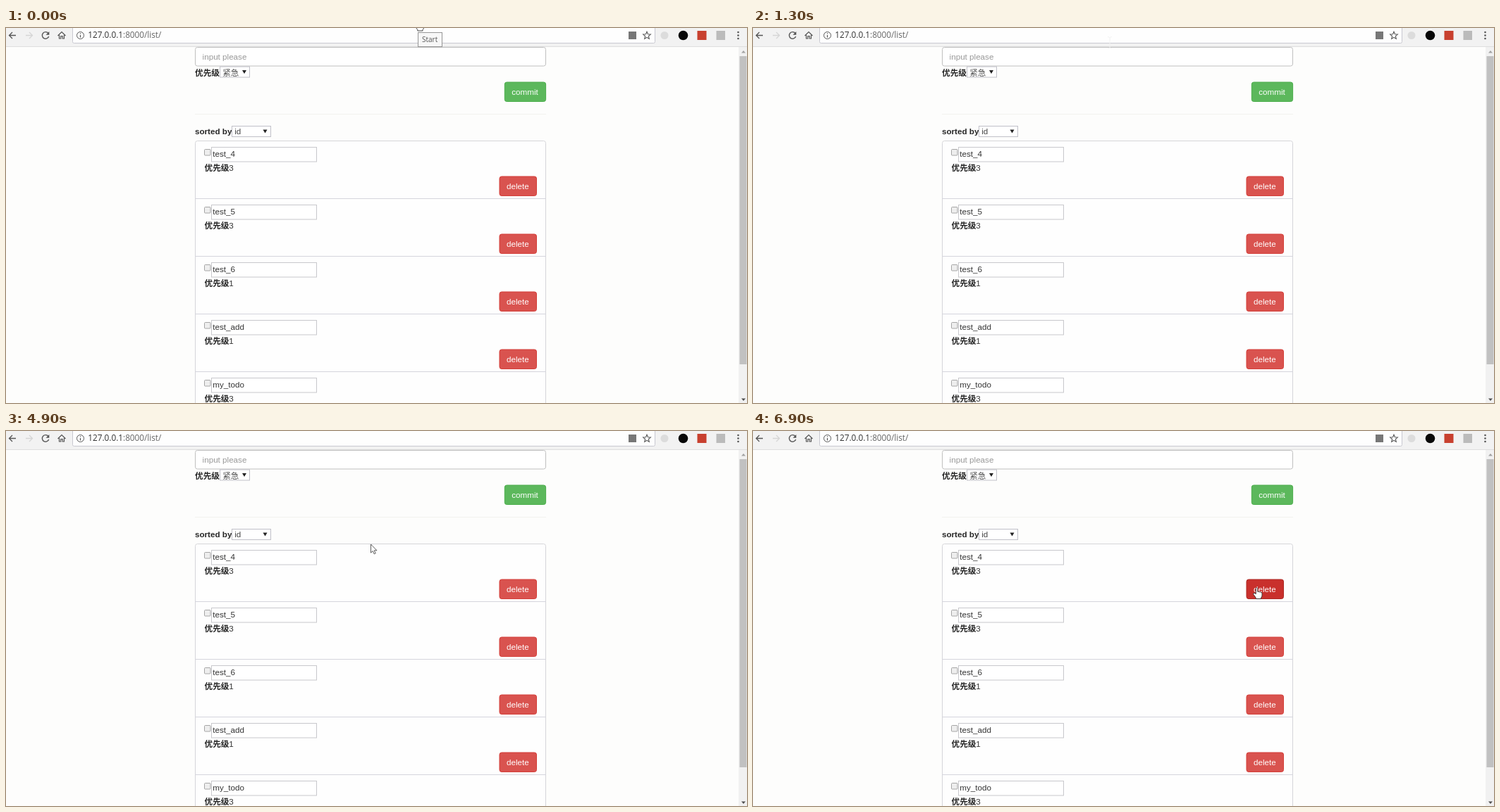
Recreate the animation shown at these times as an HTML page. Size 1051x533 px, loop 8 s.

```html
<!DOCTYPE html>
<html lang="en">
<head>
<meta charset="utf-8">
<title>Todo list</title>
<style>
html, body { margin: 0; width: 100%; height: 100%; overflow: hidden; background: #fdfdfc; }
svg { display: block; width: 1051px; height: 533px; }
text { font: 11.65px "Liberation Sans", "Noto Sans CJK SC", "Noto Sans CJK", sans-serif; fill: #333; white-space: pre; }
.b { font-weight: bold; fill: #262626; }
.ui { font: 11.75px "Open Sans", sans-serif; }
.tip text { font: 10px "Open Sans", sans-serif; fill: #575757; }
</style>
</head>
<body>
<svg id="stage" viewBox="0 0 1051 533" xmlns="http://www.w3.org/2000/svg">
  <g id="page"></g>
  <g id="chrome"></g>
  <g id="tips"></g>
  <g id="arrow">
    <path d="M.5.5V12.6L3.3 10 5.2 14.3 7.2 13.4 5.3 9.3H9Z" fill="#fff" stroke="#4a4a4a" stroke-width=".9"/>
  </g>
  <g id="beam">
    <path d="M-3-8H-1L0-7 1-8H3M0-7V7M-3 8H-1L0 7 1 8H3" fill="none" stroke="#f1f1f1"/>
  </g>
  <g id="hand">
    <path d="M-1.2 9V1Q0-1 1.3 1V6Q2.8 5 3.6 6.5 5 5.6 5.8 7 7.4 6.5 7.5 8.3V11.5Q7.3 13.5 6 14.5V16H-1.2V14.6L-4.8 9.6Q-5.2 7.7-3.3 7.9Z" fill="#fff" stroke="#333" stroke-width=".9"/>
  </g>
</svg>
<script>
const $ = id => document.getElementById(id);
const LOOP = 8000, STEP = 100;
const LEFT = 268.5, WIDTH = 497, ROW = 82, TOP = 160;

const rect = (x, y, w, h, fill, stroke = 'none', r = 0) =>
  `<rect x="${x}" y="${y}" width="${w}" height="${h}" rx="${r}" fill="${fill}" stroke="${stroke}"/>`;
const text = (x, y, s, cls = '', fill = '') =>
  `<text x="${x}" y="${y}" class="${cls}"${fill && ` style="fill:${fill}"`}>${s}</text>`;
const path = (d, stroke, fill = 'none', w = 1) =>
  `<path d="${d}" stroke="${stroke}" fill="${fill}" stroke-width="${w}"/>`;
const dot = (x, y, r, fill, stroke = 'none') =>
  `<circle cx="${x}" cy="${y}" r="${r}" fill="${fill}" stroke="${stroke}"/>`;

const caret = (x, y) => path(`M${x - 3} ${y - 2.5}h6l-3 5z`, 'none', '#222');
const select = (x, y, w, label, base, arrowX, fill) =>
  rect(x, y, w, 15, '#fff', '#c0c0c8') + text(x + 3.7, base, label, '', fill) + caret(arrowX, y + 7.5);
const button = (x, y, w, label, fill, stroke, id = '') =>
  `<g id="${id}">` + rect(x, y, w, 27.5, fill, stroke, 3) + text(x + 10, y + 18, label, '', '#fff') + '</g>';

function item(name, level, i) {
  const y = TOP + i * ROW;
  return (i ? path(`M${LEFT} ${y + .5}h${WIDTH}`, '#d5d5dd') : '')
    + rect(281.5, y + 12.5, 8.5, 8.5, '#eee', '#a5a5a5', 1)
    + rect(291.5, y + 9.5, 149, 20.5, '#fff', '#c8c8cc')
    + text(293.3, y + 23, name)
    + text(281.5, y + 43, '优先级', 'b') + text(316.3, y + 43, level)
    + button(700, y + 51, 52.5, 'delete', '#d9534f', '#d43f3a', 'del' + i);
}

function buildPage() {
  const items = [['test_4', 3], ['test_5', 3], ['test_6', 1], ['test_add', 1], ['my_todo', 3]];
  $('page').innerHTML = rect(0, 0, 1051, 533, '#fdfdfc')
    + rect(LEFT, 27.5, WIDTH, 26.5, '#fff', '#c0c0c0', 3)
    + text(278.6, 45, 'input please', '', '#999')
    + text(268, 68, '优先级', 'b')
    + select(303.5, 55, 42, '紧急', 68, 338, '#555')
    + button(707.3, 77, 58.3, 'commit', '#5cb85c', '#4cae4c')
    + path('M268 122.5h498', '#f2f2ef')
    + text(268, 151, 'sorted by', 'b')
    + select(320.5, 139.5, 55, 'id', 151, 367.5, '#444')
    + path(`M${LEFT} 533V163.5q0-3 3-3h${WIDTH - 6}q3 0 3 3V533`, '#d5d5d9', '#fefefe')
    + items.map(([name, level], i) => item(name, level, i)).join('')
    + rect(1039, 27, 12, 506, '#f1f1f1') + rect(1040.5, 40, 10, 438, '#c1c1c1')
    + path('M1043 35.5l3-3.5 3 3.5z', 'none', '#a3a3a3')
    + path('M1043 526.5l3 3.5 3-3.5z', 'none', '#505050');
}

function star(cx, cy) {
  let d = '';
  for (let i = 0; i < 10; i++) {
    const r = i % 2 ? 2.5 : 5.6, a = i * Math.PI / 5;
    d += (i ? 'L' : 'M') + (cx + r * Math.sin(a)).toFixed(2) + ' ' + (cy - r * Math.cos(a)).toFixed(2);
  }
  return path(d + 'Z', '#555', 'none', 1.1);
}

function buildChrome() {
  const ink = '#555';
  $('chrome').innerHTML = rect(0, 0, 1051, 26, '#f2f2f2')
    + path('M0 26.5h1051', '#dedede')
    + path('M94.5 0V19.5q0 2 2 2H918.5q2 0 2-2V0', '#c8c8d0', '#fefefe')
    + path('M14 10.5H4.5M9 6L4.5 10.5 9 15', ink, 'none', 1.3)
    + path('M28 10.5h9.5M33 6l4.5 4.5L33 15', '#d6d6d6', 'none', 1.3)
    + path('M60 7.5A4.8 4.8 0 1 0 60.7 12', ink, 'none', 1.4)
    + path('M61.3 5v4.7h-4.7z', 'none', ink)
    + path('M73.5 11L79 5.5 84.5 11M75.5 10V15H77.8V11.5H80.2V15H82.5V10', ink, 'none', 1.2)
    + dot(105.5, 10.5, 5, 'none', ink)
    + path('M105.5 10V13.5M105.5 7.3v1.3', ink, 'none', 1.2)
    + text(116.3, 14, '127.0.0.1<tspan fill="#666">:8000/list/</tspan>', 'ui')
    + rect(883, 5, 11, 11, '#777') + star(909, 10.8)
    + dot(934, 10.5, 5.5, '#dcdcdc') + dot(960.5, 10.5, 6.8, '#080808')
    + rect(980.5, 4, 13, 13, '#c8402f') + rect(1007.5, 4, 12.5, 13, '#bbb')
    + [6, 10.5, 15].map(y => dot(1038.5, y, 1.3, ink)).join('');
}

function buildTips() {
  const tip = (id, y, w, label) => `<g id="${id}" class="tip">`
    + rect(584.5, y, w, 20, '#f7f7f7', '#969696') + text(590, y + 13.5, label) + '</g>';
  $('tips').innerHTML = tip('start', 6.5, 34, 'Start') + tip('pause', 5.5, 39.5, 'Pause');
}

// Pointer hot spot: time, x, y
const route = [
  [0, 585, -12], [100, 585, -30], [900, 585, -20], [1000, 580, 4], [1800, 383, 49],
  [1900, 383, 51], [2000, 383, 44], [3100, 383, 43], [3500, 383, 43],
  [3800, 440, 110], [4100, 410, 178], [4400, 330, 178], [4700, 430, 176],
  [4900, 517, 160.5], [5300, 536, 165], [5400, 536, 165], [6200, 675, 208.5],
  [6300, 697, 215], [6400, 704, 219], [6700, 714.5, 225], [6800, 714.5, 225],
  [6900, 714.5, 222.5], [LOOP, 714.5, 222.5]
];

function pointerAt(t) {
  const i = route.findIndex(k => k[0] > t);
  const [t0, x0, y0] = route[i - 1], [t1, x1, y1] = route[i];
  const p = (t - t0) / (t1 - t0);
  return [x0 + (x1 - x0) * p, y0 + (y1 - y0) * p];
}

const within = (x, y, l, t, r, b) => x >= l && x <= r && y >= t && y <= b;

function render(ms) {
  const t = Math.floor(ms % LOOP / STEP) * STEP;
  const [x, y] = pointerAt(t);
  const hover = within(x, y, 700, 211, 753, 239);
  const typing = within(x, y, 94, 0, 920, 22) || within(x, y, 268, 27, 766, 54)
    || within(x, y, 291, 169, 441, 190);
  const kind = hover || t < 100 ? 'hand' : typing ? 'beam' : 'arrow';
  for (const id of ['arrow', 'beam', 'hand']) {
    $(id).setAttribute('transform', `translate(${x.toFixed(2)} ${y.toFixed(2)})`);
    $(id).setAttribute('visibility', id === kind ? 'visible' : 'hidden');
  }
  const face = $('del0').firstChild;
  face.setAttribute('fill', hover ? '#c9302c' : '#d9534f');
  face.setAttribute('stroke', hover ? '#ac2925' : '#d43f3a');
  $('start').setAttribute('opacity', t < 100 ? 1 : 0);
  $('pause').setAttribute('opacity', t < 100 ? 0 : Math.max(0, Math.min(1, (800 - t) / 350)));
}

buildPage();
buildChrome();
buildTips();
const begin = performance.now();
function tick() {
  render(performance.now() - begin);
  requestAnimationFrame(tick);
}
tick();
</script>
</body>
</html>
```
